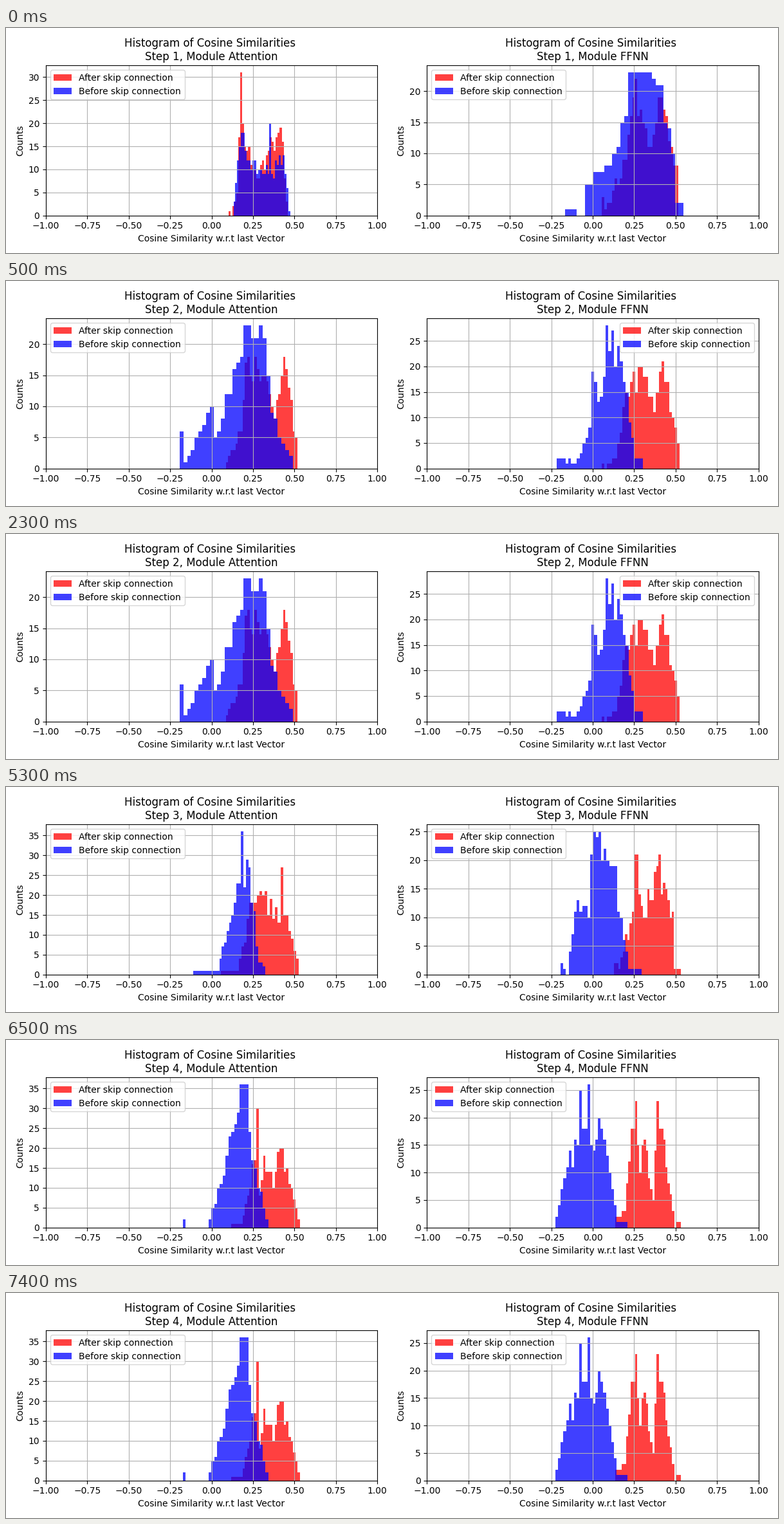
A matplotlib script for the animation above (8 s loop, 1200x350 px).

```python
import matplotlib.pyplot as plt
import numpy as np
from matplotlib.animation import FuncAnimation

BINS = 30
JITTER = 0.18
TICK_MS = 500
TICKS = 16
TICKS_PER_STEP = 6
STYLES = (("red", "After skip connection"), ("blue", "Before skip connection"))

rng = np.random.default_rng(4)


def series(low, high, *keys):
    """Bin edges and counts: straight lines through (bin, count) keys, roughened between them."""
    spots, heights = np.transpose(keys)
    rough = rng.uniform(1 - JITTER, 1 + JITTER, BINS)
    rough[spots] = 1
    counts = np.interp(np.arange(BINS), spots, heights) * rough
    return np.linspace(low, high, BINS + 1), np.minimum(np.round(counts), heights.max())


# One pair (after, before) per step.
attention = [
    (series(0.102, 0.459, (0, 1), (1, 0), (4, 5), (6, 31), (8, 15), (14, 8), (26, 19), (29, 3)),
     series(0.132, 0.475, (0, 3), (4, 18), (7, 12), (18, 9), (19, 20), (20, 9), (26, 13), (29, 1))),
    (series(0.086, 0.518, (0, 1), (6, 6), (8, 17), (16, 15), (20, 8), (24, 18), (29, 5)),
     series(-0.193, 0.490, (0, 6), (1, 1), (8, 10), (9, 5), (18, 23), (21, 23), (24, 9), (29, 2))),
    (series(0.055, 0.525, (0, 1), (6, 1), (12, 18), (16, 20), (22, 13), (23, 27), (24, 15), (29, 4)),
     series(-0.112, 0.323, (0, 1), (10, 1), (14, 11), (19, 23), (20, 36), (21, 22), (23, 27), (27, 3), (29, 2))),
    (series(0.117, 0.533, (0, 1), (4, 1), (10, 17), (11, 30), (12, 8), (14, 18), (18, 10), (21, 20), (29, 2)),
     series(-0.174, 0.343, (0, 2), (1, 0), (8, 0), (14, 13), (18, 26), (22, 36), (24, 17), (29, 2))),
]
ffnn = [
    (series(0.054, 0.516, (0, 3), (1, 1), (9, 9), (13, 22), (18, 11), (22, 19), (29, 8)),
     series(-0.167, 0.546, (0, 1), (4, 0), (5, 5), (11, 8), (17, 23), (23, 21), (27, 10), (28, 2), (29, 2))),
    (series(0.054, 0.523, (0, 1), (1, 0), (5, 2), (8, 12), (15, 20), (20, 11), (23, 21), (29, 5)),
     series(-0.217, 0.303, (0, 2), (6, 1), (11, 8), (12, 19), (15, 14), (17, 28), (22, 21), (27, 2), (29, 2))),
    (series(0.128, 0.531, (0, 2), (2, 1), (8, 11), (9, 21), (13, 10), (19, 19), (26, 11), (27, 1), (29, 1)),
     series(-0.194, 0.295, (0, 2), (2, 0), (6, 13), (10, 10), (11, 21), (14, 25), (19, 19), (25, 1), (29, 1))),
    (series(0.136, 0.531, (0, 2), (4, 3), (9, 23), (11, 10), (13, 16), (17, 5), (19, 23), (27, 0), (29, 1)),
     series(-0.225, 0.256, (0, 2), (4, 11), (8, 15), (9, 25), (11, 18), (12, 26), (13, 15), (17, 18), (23, 1), (29, 0))),
]
MODULES = (("Attention", attention), ("FFNN", ffnn))

plt.rcParams["font.family"] = "DejaVu Sans"
fig, axes = plt.subplots(1, 2, figsize=(12, 3.5), dpi=100)


def draw_panel(ax, panel, step, module):
    ax.clear()
    for (edges, counts), (color, label) in zip(panel, STYLES):
        ax.hist(edges[:-1] + np.diff(edges) / 2, bins=edges, weights=counts,
                color=color, alpha=0.75, label=label)
    ax.set_xlim(-1, 1)
    ax.set_title(f"Histogram of Cosine Similarities \nStep {step + 1}, Module {module}")
    ax.set_xlabel("Cosine Similarity w.r.t last Vector")
    ax.set_ylabel("Counts")
    ax.grid(True)
    on_right = step == 1 and module == "FFNN"
    ax.legend(loc="upper right" if on_right else "upper left")


def draw(tick):
    # The first step is shown for one tick only.
    step = (tick + TICKS_PER_STEP - 1) // TICKS_PER_STEP
    for ax, (module, panels) in zip(axes, MODULES):
        draw_panel(ax, panels[step], step, module)
    return []


draw(0)
fig.tight_layout()
anim = FuncAnimation(fig, draw, frames=TICKS, init_func=lambda: draw(0),
                     interval=TICK_MS, repeat=True, repeat_delay=0)
plt.show()
```
